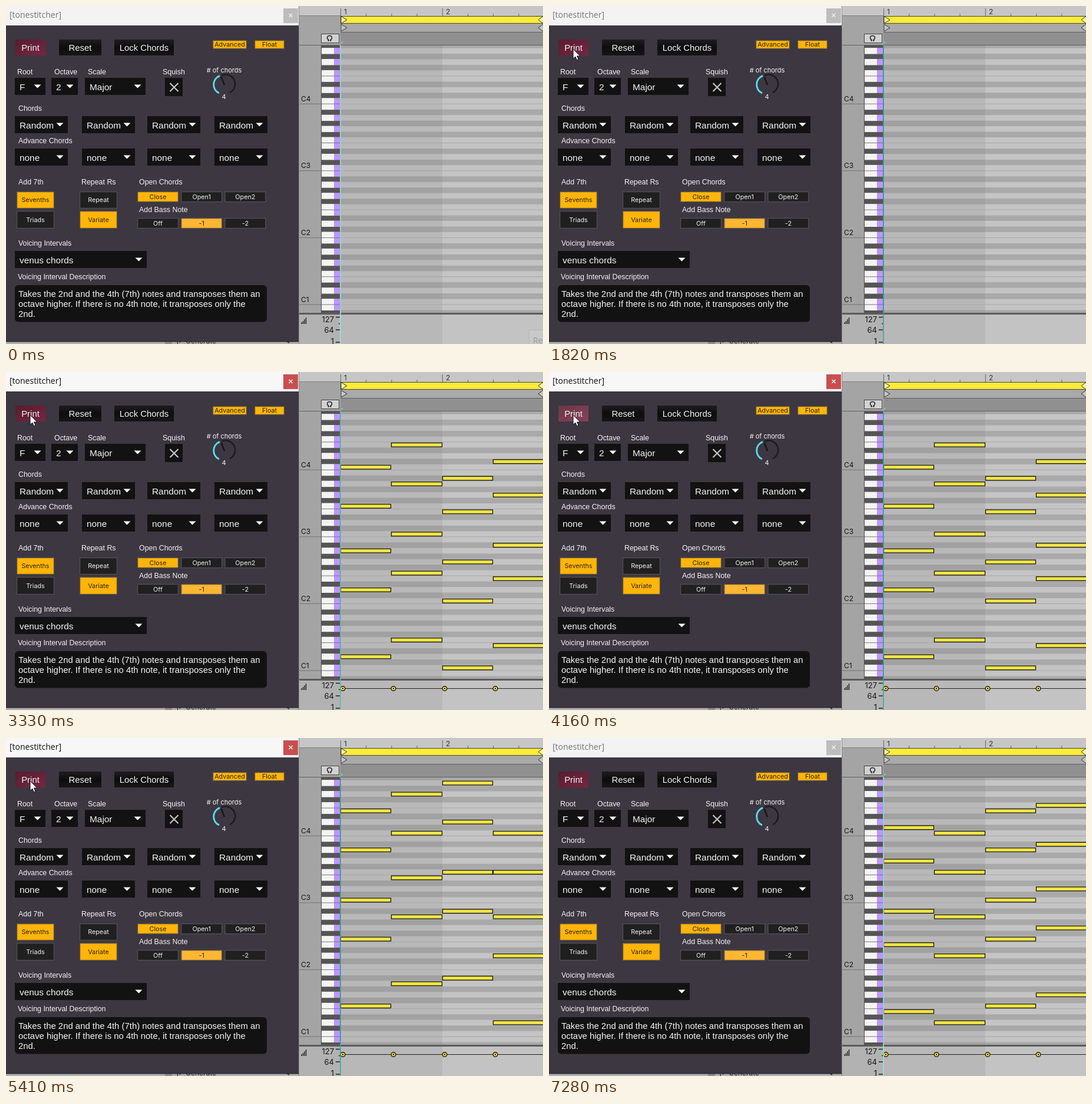
These frames come from a looping animation (912x574 px, 7.35 s). An HTML page:

```html
<!DOCTYPE html>
<html lang="en">
<head>
<meta charset="utf-8">
<title>Chord generator</title>
<style>
html, body { margin: 0; width: 100%; height: 100%; overflow: hidden; background: #b4b4b4; }
svg { display: block; width: 912px; height: 574px; }
text { white-space: pre; }
.ui { font-family: "Liberation Sans", Arial, sans-serif; fill: #f4f4f4; }
.inter { font-family: Inter, sans-serif; }
.title { font: 14px "Open Sans", sans-serif; }

/* One loop is 7350 ms; percentages are ms / 73.5 */
.loop { animation: 7350ms step-end infinite; }
#cursor { animation: move 7350ms linear infinite, seen 7350ms step-end infinite; }
#head { animation: pulse 612.5ms ease-in-out infinite alternate; }
#hint { animation-name: hint; }
#active { animation-name: active; }
#press { animation-name: press; }
#velocity { animation-name: velocity; }
#take0 { animation-name: take0; }
#take1 { animation-name: take1; }
#take2 { animation-name: take2; }
#take3 { animation-name: take3; }
#take4 { animation-name: take4; }

@keyframes move {
  0%, .95% { transform: translate(685px, 442px); }
  1.9% { transform: translate(625px, 400px); }
  2.86% { transform: translate(581px, 372px); }
  6% { transform: translate(430px, 300px); }
  10.34% { transform: translate(306px, 252px); }
  12.25% { transform: translate(170px, 196px); }
  14.286%, 15.5% { transform: translate(111px, 145px); }
  19.5%, 81.6% { transform: translate(41px, 73px); }
  83.94% { transform: translate(58px, 101px); }
  87.75% { transform: translate(250px, 280px); }
  91.5% { transform: translate(560px, 490px); }
  93.5%, 100% { transform: translate(608px, 580px); }
}
@keyframes seen { 0% { visibility: hidden; } .95% { visibility: visible; } 93.5%, 100% { visibility: hidden; } }
@keyframes pulse { from { stroke: #a2dfdf; } to { stroke: #35a3a3; } }
@keyframes hint { 0% { visibility: visible; } .95%, 100% { visibility: hidden; } }
@keyframes active { 0% { visibility: hidden; } 25.6% { visibility: visible; } 95.24%, 100% { visibility: hidden; } }
@keyframes press {
  0%, 27.6%, 38%, 57.9%, 68.8%, 77.2%, 100% { opacity: 0; }
  25.6%, 36.1%, 55.9%, 66.8%, 75.2% { opacity: .12; }
}
@keyframes velocity { 0% { visibility: hidden; } 26.5%, 100% { visibility: visible; } }
@keyframes take0 { 0% { visibility: hidden; } 26.5% { visibility: visible; } 37%, 100% { visibility: hidden; } }
@keyframes take1 { 0% { visibility: hidden; } 37% { visibility: visible; } 56.9% { visibility: hidden; } 100% { visibility: hidden; } }
@keyframes take2 { 0% { visibility: hidden; } 56.9% { visibility: visible; } 67.8%, 100% { visibility: hidden; } }
@keyframes take3 { 0% { visibility: hidden; } 67.8% { visibility: visible; } 76.2%, 100% { visibility: hidden; } }
@keyframes take4 { 0% { visibility: hidden; } 76.2%, 100% { visibility: visible; } }
</style>
</head>
<body>
<svg id="stage" viewBox="0 0 912 574" xmlns="http://www.w3.org/2000/svg"></svg>
<script>
const rect = (x, y, w, h, fill, more = '') =>
  `<rect x="${x}" y="${y}" width="${w}" height="${h}" fill="${fill}" ${more}/>`;
const path = (d, fill = 'none', stroke = 'none', width = 1, more = '') =>
  `<path d="${d}" fill="${fill}" stroke="${stroke}" stroke-width="${width}" ${more}/>`;
// Text is placed by its left edge (or anchor) and the middle of its capitals
const text = (x, mid, size, str, cls = 'ui', more = '') =>
  `<text x="${x}" y="${mid + size * .36}" font-size="${size}" class="${cls}" ${more}>${str}</text>`;
const group = (id, body, cls = 'loop') => `<g id="${id}" class="${cls}">${body}</g>`;
const each = (list, fn) => list.map(fn).join('');

const ROW = 9.467, TOP = 76.3;
const rowY = r => TOP + r * ROW;
const beats = [568, 654, 741, 827, 914];

function pianoRoll() {
  let s = rect(498, 0, 414, 574, '#a4a4a4') + rect(498, 0, 414, 17, '#c6c6c6');
  s += path('M498 16.5H568', 'none', '#7d7d7d');
  s += rect(568, 66, 173, 456, '#b8b8b8') + rect(741, 66, 171, 456, '#c4c4c4');
  s += rect(536, 66, 31, 456, '#f4f4f4') + rect(557, 66, 10, 456, '#bb98ff');
  for (let r = -1; r < 48; r++) {
    const pc = (9 - r + 48) % 12;
    const y = Math.max(66, rowY(r - .5)), h = Math.min(522, rowY(r + .5)) - y;
    if ([1, 3, 6, 8, 10].includes(pc)) {
      s += rect(568, y, 173, h, '#a1a1a1') + rect(741, y, 171, h, '#a9a9a9');
      s += rect(536, y + .5, 31, h - 1, '#555');
    }
    if (pc === 0 || pc === 5) {
      const line = rowY(r + .5);
      s += path(`M536 ${line}H567`, 'none', '#777');
      s += path(`M568 ${line}H912`, 'none', '#a8a8a8');
    }
    if (pc === 0) {
      s += path(`M498 ${rowY(r + .5)}H536`, 'none', '#747474');
      s += text(501, rowY(r) - 4, 12, 'C' + (4 - (r - 9) / 12), 'inter', 'fill="#161616"');
    }
  }
  s += path('M535.5 66V522M567.5 44V522', 'none', '#4c4c4c');

  // Ruler, loop brace and locator strip
  for (let i = 0; i < 8; i++) {
    const x = 568.5 + i * 43.2;
    s += path(`M${x} ${i % 4 ? 13 : 4}V17`, 'none', '#666');
  }
  s += text(574, 9.5, 12, '1', 'inter', 'fill="#333"') + text(747, 9.5, 12, '2', 'inter', 'fill="#333"');
  s += rect(568, 30, 344, 14, '#a9a9a9') + rect(498, 44, 414, 22, '#909090');
  s += rect(498, 44, 70, 22, '#a4a4a4');
  s += rect(568.5, 17.5, 345, 12, '#ffec36', 'stroke="#444"');
  s += path('M568 44.5H912M498 66.5H912', 'none', '#606060');
  s += each([17.5, 31], y =>
    path(`M569 ${y}L579 ${y + 6}L569 ${y + 12}ZM912 ${y}L904 ${y + 6}L912 ${y + 12}`,
      y < 20 ? '#fff39a' : '#c4c4c4', '#333'));
  s += rect(535.5, 47.5, 30, 15, '#d2d2d2', 'stroke="#444"');
  s += path('M546.5 59H548V57.5C544.5 56 544.5 50.5 549.5 50.5S554.500 56 551 57.5V59H552.500',
    'none', '#222', 1.5);
  s += path('M569 61h4l-4 4z', '#74c7c7');

  // Velocity lane
  s += rect(498, 522, 414, 52, '#b2b2b2') + rect(568, 524, 173, 50, '#b8b8b8') +
    rect(741, 524, 171, 50, '#c3c3c3');
  s += rect(498, 521, 414, 3, '#5b5b5b');
  s += each([['127', 532], ['64', 550], ['1', 569]], ([v, y]) =>
    text(557, y, 13, v, 'inter', 'text-anchor="end" fill="#161616"'));
  s += path('M560 528.5H567M560 550H567M560 571H567M565 539.5H567', 'none', '#222', 1.3);
  s += path('M502 540V537M504.500 540V535M507 540V532M509.500 540V529', 'none', '#222', 1.4);
  return s;
}

const chords = {
  G: [4, 11, 19, 26, 38], Bb: [0, 7, 16, 23, 35], C: [11, 17, 26, 33, 45],
  E: [8, 14, 23, 29, 41], D: [9, 16, 24, 31, 43], F: [5, 12, 21, 28, 40],
  A: [2, 9, 17, 24, 36]
};
const takes = ['G Bb C E', 'D F C E', 'Bb C A E', 'F A Bb D', 'E D F G'];

const notes = take => each(take.split(' '), (name, i) =>
  each(chords[name], r =>
    rect(beats[i] + .5, rowY(r) - 3.2, beats[i + 1] - beats[i] - 1, 6.7, '#f0e443',
      'stroke="#141414" stroke-width="1.3"')));

const velocity = path('M568 537.5H912', 'none', '#222', 1.2) +
  each([572, 658, 745, 831], x =>
    `<circle cx="${x}" cy="537.5" r="3.8" fill="#f5e63c" stroke="#1c1c1c" stroke-width="1.4"/>
     <circle cx="${x}" cy="537.5" r="1.3" fill="#1c1c1c"/>`);

const button = (x, w, label, fill) =>
  rect(x, 57, w, 27, fill) + text(x + w / 2, 71, 14.9, label, 'ui', 'text-anchor="middle"');

function menu(x, y, w, label, h = 29) {
  const cx = x + w - 13.5, cy = y + h / 2;
  return rect(x, y, w, h, '#121212') + text(x + 8, cy + .5, 15.4, label) +
    path(`M${cx - 6} ${cy - 3}h12l-6 6z`, '#fff');
}

const toggle = (x, y, w, h, label, on) =>
  rect(x + .5, y + .5, w - 1, h - 1, on || '#202020', `stroke="${on ? '#5d5145' : '#514d55'}" stroke-width="1.4"`) +
  text(x + w / 2, y + h / 2, 10.8, label, 'inter',
    `text-anchor="middle" fill="${on ? '#2c2208' : '#f0f0f0'}"`);

function plugin() {
  const amber = '#ffb508', cols = [15, 129, 240, 354];
  let s = rect(0, 570, 498, 4, '#aeaeae') + rect(270, 570, 12, 4, '#8c8c8c');
  s += `<g clip-path="url(#strip)">${text(289, 569, 12, '(›', 'inter', 'fill="#222"')}` +
    `${text(305, 569, 12, 'Generate', 'inter', 'fill="#222"')}${path('M473 568h8v5z', '#333')}</g>`;
  s += rect(0, 33, 497, 537, '#3c3741') + rect(0, 569, 497, 1.5, '#2a272e');
  s += rect(497, 0, 1, 574, '#86838a');

  s += button(16, 51, 'Print', 'url(#red)') + button(90, 72, 'Reset', 'url(#black)') +
    button(184, 101, 'Lock Chords', 'url(#black)');
  s += toggle(351, 58, 58, 15, 'Advanced', amber) + toggle(422, 58, 51, 15, 'Float', amber);

  s += each([
    [19, 112, 'Root'], [82, 112, 'Octave'], [139, 112, 'Scale'], [266, 112, 'Squish'],
    [21, 174, 'Chords'], [21, 229, 'Advance Chords'], [21, 299, 'Add 7th'],
    [128, 299, 'Repeat Rs'], [226, 299, 'Open Chords'], [226, 346, 'Add Bass Note'],
    [21, 403, 'Voicing Intervals'], [20, 460, 'Voicing Interval Description']
  ], ([x, y, label]) => text(x, y, 12.4, label));

  s += menu(15, 122, 52, 'F') + menu(77, 122, 45, '2') + menu(134, 122, 103, 'Major');
  s += rect(270, 122, 30, 31, '#121212') + path('M278.500 131l14 14m0 -14l-14 14', 'none', '#c4c4c4', 2.2);
  s += each(cols, x => menu(x, 187, 90, 'Random') + menu(x, 242, 90, 'none'));
  s += menu(15, 416, 224, 'venus chords');

  // Dial
  s += text(370.5, 109, 11, '# of chords', 'inter', 'text-anchor="middle" fill="#f4f4f4"');
  s += path('M366 118A15.500 15.500 0 0 1 380 147', 'none', '#1d1b20', 2.5);
  s += path('M362 148A16 16 0 0 1 363 118.500', 'none', '#58dcf0', 3);
  s += path('M371 134L365.500 120', 'none', '#161616', 2.5);
  s += text(370, 154.500, 11, '4', 'inter', 'text-anchor="middle" fill="#f4f4f4"');

  s += toggle(18, 315, 64, 29, 'Sevenths', amber) + toggle(18, 348, 64, 30, 'Triads');
  s += toggle(125, 315, 64, 29, 'Repeat') + toggle(125, 348, 64, 30, 'Variate', amber);
  s += each(['Close', 'Open1', 'Open2'], (t, i) => toggle(223 + i * 74.2, 315, 70, 18, t, i ? '' : amber));
  s += each(['Off', '-1', '-2'], (t, i) => toggle(223 + i * 74.2, 360, 70, 18, t, i === 1 ? '#ffb632' : ''));

  s += rect(15, 474, 428, 62.5, '#121212', 'rx="6"');
  s += each([
    'Takes the 2nd and the 4th (7th) notes and transposes them an',
    'octave higher. If there is no 4th note, it transposes only the',
    '2nd.'
  ], (line, i) => text(21, 488.500 + i * 17, 14.9, line));
  return s;
}

const titleBar = (bg, ink, close, cross) =>
  rect(0, 0, 497, 33, bg) + text(6, 15, 14, '[tonestitcher]', 'title', `fill="${ink}"`) +
  rect(471, 4, 25, 25, close) + path('M480.500 13l6 6m0 -6l-6 6', 'none', cross, 1.4);

const defs = `<defs>
  <linearGradient id="red" x2="1" y2="1"><stop stop-color="#571d30"/><stop offset="1" stop-color="#762640"/></linearGradient>
  <linearGradient id="black" x2="0" y2="1"><stop stop-color="#1d1c1f"/><stop offset=".5" stop-color="#0d0d0d"/><stop offset="1" stop-color="#171618"/></linearGradient>
  <clipPath id="strip"><rect y="570" width="497" height="4"/></clipPath>
</defs>`;

document.getElementById('stage').innerHTML = defs + pianoRoll() +
  each(takes, (take, i) => group('take' + i, notes(take))) +
  group('velocity', velocity) +
  path('M568 66V574', 'none', '#a2dfdf', 1.6, 'id="head"') +
  group('hint', rect(888.5, 550.5, 30, 30, '#c9c9c9', 'stroke="#b8b8b8"') +
    text(895, 568, 14, 'Re', 'title', 'fill="#999"')) +
  plugin() +
  group('press', rect(16, 57, 51, 27, '#fff')) +
  titleBar('#f3f3f3', '#777', '#bdbdbd', '#eee') +
  group('active', titleBar('#f7f7f7', '#111', '#c94f4f', '#fff')) +
  group('cursor', path('M0 0V16.500L3.800 13L6.300 18.700L9 17.500L6.500 12H11.800Z', '#fff', '#111', 1), '');
</script>
</body>
</html>
```
